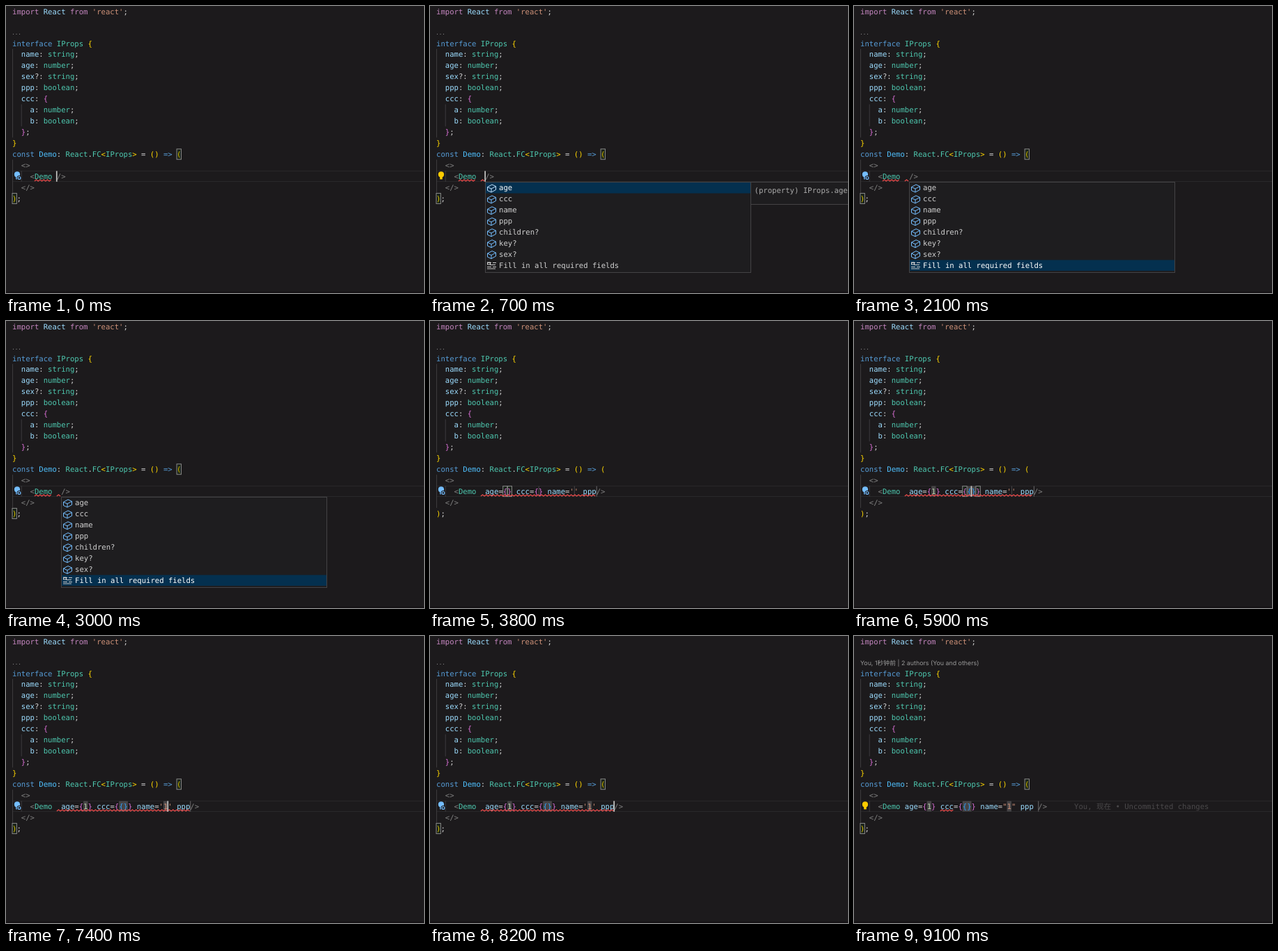
An HTML page that plays this animation: 600x413 px, repeating every 9.2 s.

```html
<!DOCTYPE html>
<html lang="zh">
<head>
<meta charset="utf-8">
<style>
html, body { margin: 0; width: 100%; height: 100%; overflow: hidden; background: #1c1a1c; }
svg { display: block; }
text { white-space: pre; font: 10.6px "DejaVu Sans Mono", "Noto Sans CJK SC", "Noto Sans CJK", monospace; text-rendering: geometricPrecision; }
.lens { font: 8.85px Inter, "Noto Sans CJK SC", "Noto Sans CJK", sans-serif; }
</style>
</head>
<body>
<svg id="stage" width="600" height="413" viewBox="0 0 600 413"></svg>
<script>
const LOOP = 9200, CW = 6.381, LH = 15.93, LEFT = 9, TOP = 45.9, TAG = 12;
const COLORS = { m: '#c586c0', v: '#9cdcfe', o: '#ce9178', w: '#d4d4d4', k: '#569cd6', t: '#4ec9b0',
  y: '#ffd700', p: '#da70d6', i: '#2f9df4', g: '#808080', n: '#b5cea8', c: '#4fc1ff' };

// moments of the user's actions, in ms
const AT = { space: 300, menu: 500, detail: 600, up: 1500, accept: 3200, age: 4600, toCcc: 5200,
  ccc: 5800, cccMatch: 6100, toName: 6500, name: 7300, toEnd: 8200, format: 8600, blame: 8800 };
const KEYS = [0, AT.space, AT.accept, AT.age, AT.toCcc, AT.ccc, AT.toName, AT.name, AT.toEnd, AT.format];

const colX = c => LEFT + c * CW;
const rowY = r => TOP + r * LH;
const esc = s => s.replace(/&/g, '&amp;').replace(/</g, '&lt;');
const text = (x, y, s, fill, extra = '') => `<text x="${x}" y="${y}" fill="${fill}" ${extra}>${esc(s)}</text>`;
const rect = (x, y, w, h, fill, stroke = 'none') =>
  `<rect x="${x}" y="${y}" width="${w}" height="${h}" fill="${fill}" stroke="${stroke}"/>`;
const path = (d, stroke, width = 1) => `<path d="${d}" fill="none" stroke="${stroke}" stroke-width="${width}"/>`;

// "code~text|code~text" becomes one coloured line
const code = (top, line) => `<text x="${LEFT}" y="${top + 11.6}">` + line.split('|').map(part => {
  const [c, s] = part.split('~');
  return `<tspan fill="${COLORS[c]}">${esc(s)}</tspan>`;
}).join('') + '</text>';

const field = (name, type, pad = '  ') => `v~${pad}${name}|w~: |t~${type}|w~;`;
const LINES = [
  'k~interface |t~IProps |y~{', field('name', 'string'), field('age', 'number'), 'v~  sex|w~?: |t~string|w~;',
  field('ppp', 'boolean'), 'v~  ccc|w~: |p~{', field('a', 'number', '    '), field('b', 'boolean', '    '),
  'p~  }|w~;', 'y~}', 'k~const |c~Demo|w~: |t~React|w~.|t~FC|y~<|t~IProps|y~>|w~ = |y~() |k~=> |y~(',
  'g~  <>', '', 'g~  </>', 'y~)|w~;'];

const guide = (x, r1, r2) => path(`M${x} ${rowY(r1)}V${rowY(r2)}`, '#3c3b3d');
const BASE = rect(0, 0, 600, 413, '#1c1a1c') + rect(0, 411, 600, 2, '#151215') +
  path(`M${LEFT} 237.5H600M${LEFT} 252.5H600`, '#29282a') +
  guide(9.5, 1, 9) + guide(22.2, 6, 8) + guide(9.5, 11, 14) + guide(22.2, 12, 13) +
  code(0.7, "m~import |v~React |m~from |o~'react'|w~;") +
  LINES.map((line, r) => line && code(rowY(r), line)).join('');

const box = (r, c) => rect(colX(c), rowY(r) + 0.6, CW, LH - 1, 'rgba(0,100,0,.1)', '#8a8a8a');

function squiggle(from, to) {
  let d = `M${colX(from)} 252`, up = true;
  for (let x = colX(from) + 2.65; x <= colX(to); x += 2.65, up = !up) d += `L${x} ${up ? 250 : 252}`;
  return path(d, '#f14c4c', 1.1);
}

function bulb(yellow) {
  const fill = yellow ? '#ffcc00' : '#75beff';
  const lamp = `<circle cx="16" cy="242.4" r="4.1" fill="${fill}"/>` + rect(14.2, 245, 3.6, 4.4, fill);
  const gear = '<circle cx="19" cy="247.4" r="2" fill="#1c1a1c" stroke="#1c1a1c" stroke-width="3"/>' +
    '<circle cx="19" cy="247.4" r="1.9" fill="none" stroke="#75beff" stroke-width="1.2"/>';
  return lamp + (yellow ? '' : gear);
}

const ITEMS = ['age', 'ccc', 'name', 'ppp', 'children?', 'key?', 'sex?', 'Fill in all required fields'];

function menu(sel, detail) {
  let out = rect(79.5, 253.5, 381, 130, '#1e1d1f', '#444345');
  ITEMS.forEach((item, i) => {
    const y = 254 + i * LH, m = y + 8, on = i === sel;
    if (on) out += rect(80, y, 380, LH - 0.4, '#04304f');
    out += i === 7
      ? path(`M82 ${m - 4}h6m2 0h5M86 ${m - 1}h8M82 ${m + 2}h6m2 0h5M82 ${m + 4.5}h12`, '#d0d0d0', 1.1) +
        rect(82.5, m - 4.5, 4, 3, 'none', '#d0d0d0')
      : path(`M82.5 ${m - 1.5}l6.5-3.5l5.5 2.5v5l-6.5 3.5l-5.5-2.5zl5.5 2.5l6.5-3.5m-6.5 3.5v5`, on ? '#c4e2ff' : '#75beff');
    out += text(99, y + 11.4, item, on ? '#ffffff' : '#d0d0d0');
  });
  if (detail) out += rect(460.5, 253.5, 150, 32, '#1e1d1f', '#444345') +
    text(465.5, 268.8, '(property) IProps.age', '#a9a9a9');
  return out;
}

function draw(t) {
  const after = key => t >= AT[key];
  const filled = after('accept'), formatted = after('format');
  const one = after('age') ? '1' : '', inner = after('ccc') ? '{}' : '', str = after('name') ? '1' : '';
  const quote = formatted ? '"' : "'";
  const gap = after('space') && !formatted ? '  ' : ' ';

  // columns of the snippet stops
  const age = 4 + 5 + gap.length + 5;
  const ccc = age + one.length + 7;
  const name = ccc + inner.length + 8;
  const end = name + str.length + 5 + (formatted ? 1 : 0);

  let line = `g~    <|t~Demo${gap}`, marks = '', boxes = '', waves = '', cursor;
  if (filled) {
    line += `|v~age|w~=|p~{|n~${one}|p~} |v~ccc|w~=|p~{|i~${inner}|p~} |v~name|w~=|o~${quote + str + quote}|v~ ppp` +
      (formatted ? ' ' : '');
    for (const [c, n] of [[age, one.length], [ccc, inner.length], [name, str.length]])
      marks += rect(colX(c), 237.6, n * CW || 1, 15, '#464446');
    marks += rect(colX(end), 237.6, 1, 15, '#6a686a');
    waves = formatted ? squiggle(18, 21) : squiggle(10, end);
    cursor = after('toEnd') ? end : after('toName') ? name + str.length
      : after('toCcc') ? ccc + inner.length / 2 : age + one.length;
  } else {
    cursor = 9 + gap.length;
    waves = squiggle(5, 9) + (after('space') ? squiggle(10, 11) : '');
  }
  line += '|g~/>';

  if (!filled || after('toName')) boxes = box(10, 37) + box(14, 0);
  else if (!after('toCcc')) boxes = box(TAG, age - 1) + box(TAG, age + one.length);
  else if (after('cccMatch')) boxes = box(TAG, ccc) + box(TAG, ccc + 1);
  else boxes = box(TAG, ccc - 1) + box(TAG, ccc + inner.length);

  const lastKey = KEYS.filter(k => k <= t).pop();
  const lit = Math.floor((t - lastKey) / 500) % 2 === 0;
  const yellow = (after('space') && !after('up')) || formatted;

  let out = BASE + marks + boxes + code(rowY(TAG), line) + waves + bulb(yellow);
  if (lit) out += rect(colX(cursor) - 0.9, 237.4, 1.7, 15.4, '#c4c4c2');
  if (after('blame'))
    out += text(9, 42, 'You, 1秒钟前 | 2 authors (You and others)', '#999', 'class="lens"') +
      text(316, rowY(TAG) + 11.6, 'You, 现在 • Uncommitted changes', '#4b494b');
  else out += text(9.3, 40.5, '...', '#999', 'class="lens" letter-spacing="1.9"');
  if (after('menu') && !filled) out += menu(after('up') ? 7 : 0, after('detail') && !after('up'));
  return out;
}

const stage = document.getElementById('stage');
let shown = -1;
function tick() {
  const t = Math.floor(performance.now() % LOOP / 100) * 100;
  if (t !== shown) stage.innerHTML = draw(shown = t);
  requestAnimationFrame(tick);
}
tick();
</script>
</body>
</html>
```
